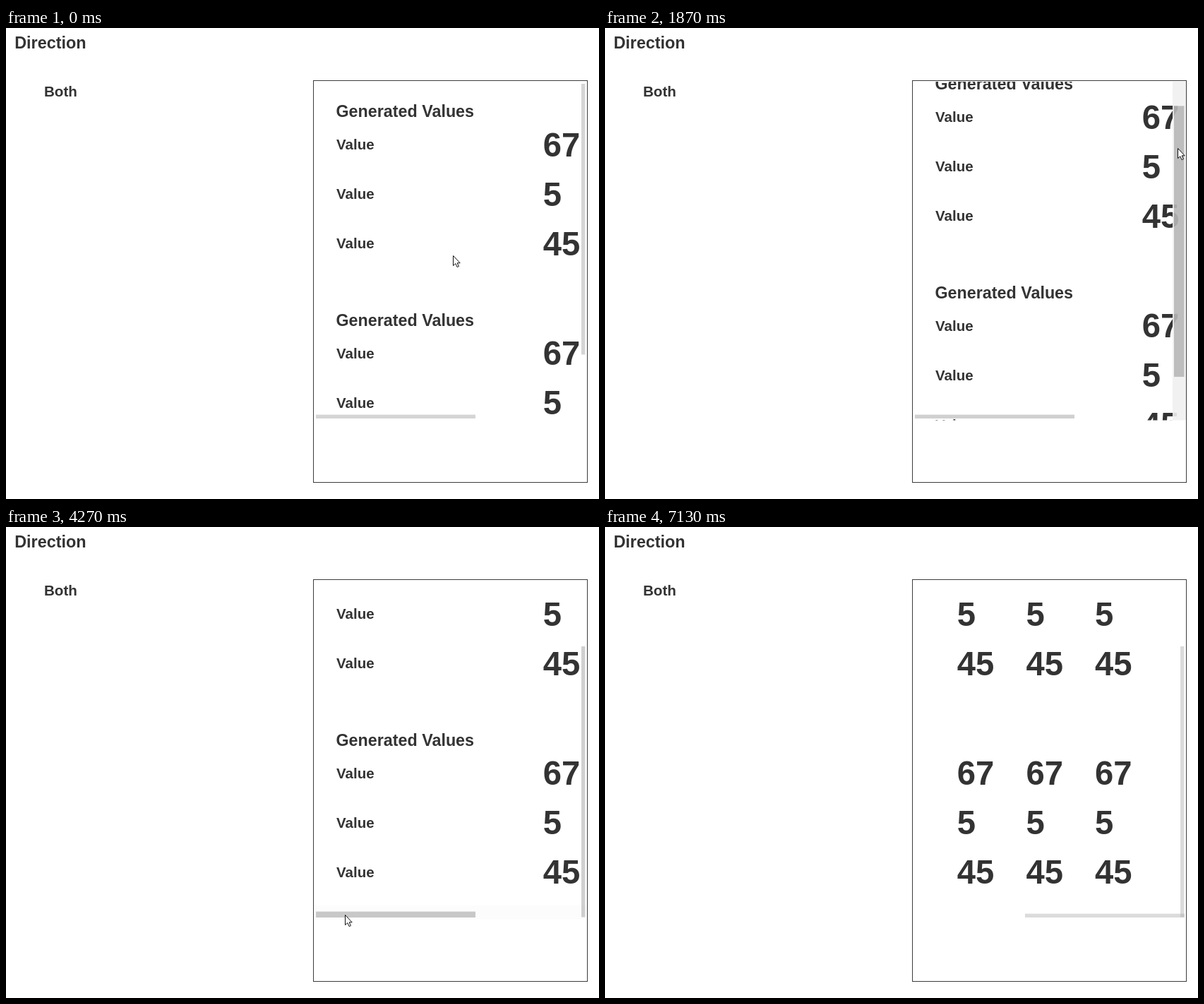
Recreate the animation shown at these times as an HTML page. Size 840 px wide and 667 px high, loop 7340 ms.

```html
<!DOCTYPE html>
<html lang="en">
<head>
<meta charset="utf-8">
<title>Direction: Both</title>
<style>
  html, body { margin: 0; width: 100%; height: 100%; overflow: hidden; background: #fff; }
  svg { display: block; width: 840px; height: 667px; }
  text { font-family: "Liberation Sans", Arial, sans-serif; font-weight: bold; fill: #333; }
  .title { font-size: 23.4px; }
  .name { font-size: 20.6px; }
  .head { font-size: 23.3px; }
  .label { font-size: 20.5px; }
  .num { font-size: 47.2px; }
  .rail { fill: #f0f0f0; }
</style>
</head>
<body>
<svg viewBox="0 0 840 667">
  <defs>
    <clipPath id="view"><rect x="436" y="76" width="387" height="479.5"/></clipPath>
  </defs>
  <text class="title" x="12.2" y="28.5">Direction</text>
  <text class="name" x="54" y="97">Both</text>
  <rect x="435.5" y="74.5" width="388" height="569" fill="none" stroke="#3c3c3c"/>
  <g clip-path="url(#view)"><g id="content"></g></g>
  <g id="barX">
    <rect class="rail" x="437" y="536" width="385" height="19.5"/>
    <rect class="thumb" width="226"/>
  </g>
  <g id="barY">
    <rect class="rail" x="804" y="76" width="19" height="479.5"/>
    <rect class="thumb" height="383.5"/>
  </g>
  <path id="cursor" d="M.5.5V14.6L3.8 11.6L6.1 16.6L8.4 15.6L6.2 10.8H10.2Z" fill="#fff" stroke="#111"/>
</svg>
<script>
const LOOP = 7340, STEP = 200 / 3, LAST = 107;
const $ = s => document.querySelector(s);
const content = $('#content'), cursor = $('#cursor');

const set = (el, attrs) => Object.entries(attrs).forEach(([k, v]) => el.setAttribute(k, v));
const clamp = (v, lo, hi) => Math.min(hi, Math.max(lo, v));
const ramp = (t, from, to) => clamp((t - from) / (to - from), 0, 1);

function addText(cls, x, y, str) {
  const el = document.createElementNS('http://www.w3.org/2000/svg', 'text');
  set(el, { class: cls, x, y });
  el.textContent = str;
  content.append(el);
}

for (const top of [0, 295.5]) {
  addText('head', 467.5, top + 126.3, 'Generated Values');
  [67, 5, 45].forEach((n, row) => {
    const y = top + row * 70;
    addText('label', 468, y + 172, 'Value');
    for (let col = 0; col < 3; col++) addText('num', 760.8 + col * 97.6, y + 181.7, n);
  });
}

// Pointer moves: from, to (ms), target x, y
const home = { x: 633, y: 322 };
const moves = [
  [0, 600, 811, 121],       // to the vertical bar
  [1070, 1530, 812, 132],
  [1560, 2590, 807, 260],   // drag down
  [3000, 3067, 804, 264],
  [3067, 3600, 453, 577],   // to the horizontal bar
  [3600, 3800, 480, 543],
  [3867, 4067, 480, 549],
  [4533, 5275, 676, 543],   // drag right
  [5300, 5467, 672, 546],
  [5870, 5933, 674, 551],
  [5933, 6333, 360, 690]    // out of the stage
];

function pointer(t) {
  return moves.reduce((p, [from, to, x, y]) => {
    const k = ramp(t, from, to);
    return { x: p.x + (x - p.x) * k, y: p.y + (y - p.y) * k };
  }, home);
}

// grab: pointer place where the thumb is taken; travel: thumb range; range: scroll range
const bars = {
  x: { el: $('#barX'), drag: [4533, 5275], grab: 485, travel: 156, range: 262, enter: 4200, leave: 5923 },
  y: { el: $('#barY'), drag: [1560, 2590], grab: 132, travel: 90, range: 111.7, enter: 733, leave: 3010 }
};

// Moves and fades one scrollbar, returns the scroll offset
function drawBar(axis, t) {
  const { el, drag, grab, travel, range, enter, leave } = bars[axis];
  const pos = clamp((pointer(clamp(t, ...drag))[axis] - grab) / 1.215, 0, travel);
  const shown = out => ramp(t, enter, enter + 200) - ramp(t, out, out + 200);
  const hover = shown(leave), size = 5.4 + 9 * shown(leave + 57);
  const idle = .49 + .06 * ramp(t, 0, 1000) - .13 * ramp(t, 5933, 6400);
  const shade = 170 + 12 * hover;
  const [rail, thumb] = el.children;
  set(el, { opacity: idle + (.9 - idle) * hover });
  set(rail, { opacity: hover });
  set(thumb, { fill: `rgb(${shade},${shade},${shade})` });
  set(thumb, axis === 'x'
    ? { x: 439 + pos, y: 553 - size, height: size }
    : { x: 820.4 - size, y: 79 + pos, width: size });
  return pos / travel * range;
}

function draw(ms) {
  const t = Math.min(LAST, Math.floor((ms % LOOP + 4) / STEP)) * STEP + .5;
  const dx = drawBar('x', t), dy = drawBar('y', t), { x, y } = pointer(t);
  set(content, { transform: `translate(${-dx} ${-dy})` });
  set(cursor, { transform: `translate(${Math.round(x)} ${Math.round(y)})` });
}

const start = performance.now();
(function frame() {
  draw(performance.now() - start);
  requestAnimationFrame(frame);
})();
</script>
</body>
</html>
```
